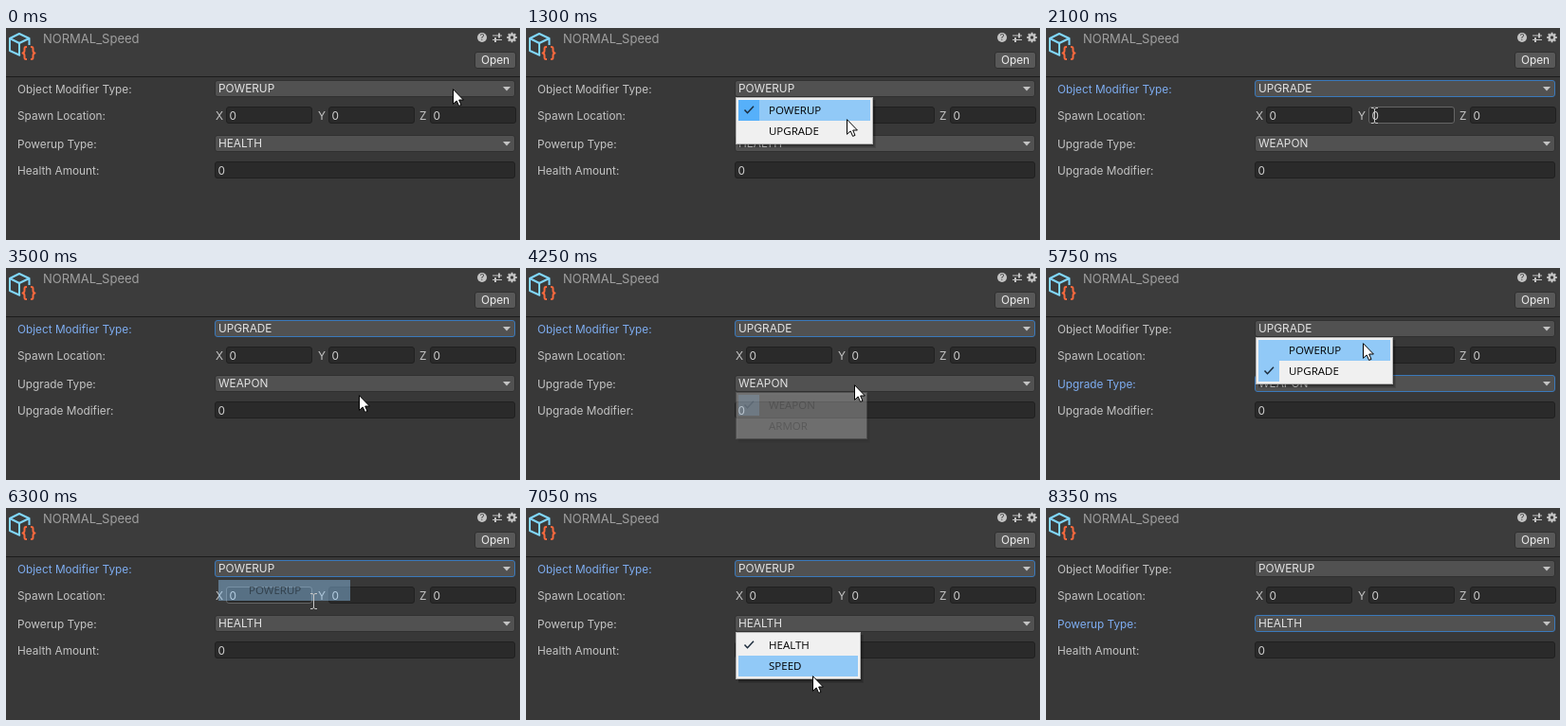
These frames come from a looping animation (542x224 px, 8.4 s). An HTML page with a canvas:

```html
<!DOCTYPE html>
<html lang="en">
<head>
<meta charset="utf-8">
<title>Inspector</title>
<style>
html, body { margin: 0; width: 100%; height: 100%; overflow: hidden; background: #383838; }
canvas { display: block; }
</style>
</head>
<body>
<canvas id="stage" width="542" height="224"></canvas>
<script>
const ctx = document.getElementById('stage').getContext('2d');
const LOOP = 8400, STEP = 50;
const UI = 'Inter, sans-serif', MENU = '"Open Sans", "Noto Sans", sans-serif';

// Pointer path: time, x, y of the tip
const PATH = [
  [0, 471, 64], [900, 471, 64], [1300, 338, 96], [1500, 334, 104], [1750, 334, 104],
  [2550, 363, 75], [2650, 364, 75], [3250, 364, 75], [3500, 372, 134], [3800, 372, 134],
  [4050, 346, 123], [4600, 346, 123], [4800, 342, 161], [5000, 345, 87], [5200, 346, 67],
  [5500, 346, 66], [5950, 326, 88], [6200, 326, 88], [6300, 324, 98], [6500, 318, 122],
  [6800, 312, 126], [7000, 302, 176], [7050, 302, 177], [7250, 302, 177], [7400, 290, 230], [LOOP, 290, 230]
];

const MENUS = [
  { open: 550, close: 1750, y: 73, w: 145, items: ['POWERUP', 'UPGRADE'], checked: 0, pick: 1 },
  { open: 4250, close: 5200, y: 131, w: 139, items: ['WEAPON', 'ARMOR'], checked: 0 },
  { open: 5500, close: 6200, y: 73, w: 145, items: ['POWERUP', 'UPGRADE'], checked: 1, pick: 0 },
  { open: 6600, close: 7700, y: 131, w: 132, items: ['HEALTH', 'SPEED'], checked: 0, plainCheck: true }
];
const CLICKS = [250, 4050];
const FADE_IN = 250, FADE_OUT = 180, ROW = 22;
const FIELDS = [['X', 221, 232], ['Y', 329, 340], ['Z', 436, 447]];

function pointerAt(t) {
  const i = PATH.findIndex(p => p[0] > t);
  const [t0, x0, y0] = PATH[i - 1], [t1, x1, y1] = PATH[i];
  const u = (t - t0) / (t1 - t0), e = u * u * (3 - 2 * u);
  return { x: Math.round(x0 + (x1 - x0) * e), y: Math.round(y0 + (y1 - y0) * e) };
}

function rect(x, y, w, h, color) {
  ctx.fillStyle = color;
  ctx.fillRect(x, y, w, h);
}

function box(x, y, w, h, fill, border) {
  ctx.beginPath();
  ctx.roundRect(x + .5, y + .5, w - 1, h - 1, 2.5);
  ctx.fillStyle = fill;
  ctx.fill();
  ctx.strokeStyle = border;
  ctx.lineWidth = 1;
  ctx.stroke();
}

function text(str, x, y, color, size = 11.8, family = UI, align = 'left') {
  ctx.font = `${size}px ${family}`;
  ctx.textAlign = align;
  ctx.fillStyle = color;
  ctx.fillText(str, x, y);
}

function line(path, color, width) {
  ctx.strokeStyle = color;
  ctx.lineWidth = width;
  ctx.stroke(new Path2D(path));
}

function shape(path, color) {
  ctx.fillStyle = color;
  ctx.fill(new Path2D(path));
}

function disc(x, y, r, color) {
  ctx.fillStyle = color;
  ctx.beginPath();
  ctx.arc(x, y, r, 0, 2 * Math.PI);
  ctx.fill();
}

function drawHeader() {
  const grey = '#c4c4c4', back = '#3c3c3c';
  rect(0, 0, 542, 51, back);
  rect(0, 51, 542, 1, '#1c1c1c');

  ctx.lineJoin = 'round';
  line('M15 29L4 24V11L14 6L24.5 11V18M4 11L14 16L24.5 11M14 16V29', '#81d7fc', 2);
  line('M22 20H21Q19.5 20 19.5 22V24Q19.5 26 17.5 26.5Q19.5 27 19.5 29V31Q19.5 33 21 33H22' +
       'M26 20H27Q28.5 20 28.5 22V24Q28.5 26 30.5 26.5Q28.5 27 28.5 29V31Q28.5 33 27 33H26', '#f8693e', 2);
  ctx.lineJoin = 'miter';
  text('NORMAL_Speed', 39, 16, '#a0a0a0', 13);

  disc(502, 10, 5, grey);
  text('?', 502, 13.3, back, 9, `bold ${UI}`.replace('bold ', ''), 'center');
  line('M513 8H523M513 12.5H523', grey, 1.2);
  rect(519, 5.5, 2, 5, grey);
  rect(515, 10, 2, 5, grey);

  ctx.save();
  ctx.translate(533.5, 10);
  for (let i = 0; i < 8; i++) {
    rect(-1, -5.3, 2, 3, grey);
    ctx.rotate(Math.PI / 4);
  }
  ctx.restore();
  disc(533.5, 10, 3.9, grey);
  disc(533.5, 10, 1.7, back);

  box(494, 25, 44, 18, '#585858', '#303030');
  text('Open', 516, 38, '#eeeeee', 11.8, UI, 'center');
}

function drawLabel(str, y, focused) {
  text(str, 12, y, focused ? '#7eadf1' : '#c4c4c4');
}

function drawDropdown(label, value, y, focused) {
  drawLabel(label, y + 14, focused);
  box(220, y, 317, 18, '#515151', focused ? '#3a79bb' : '#303030');
  text(value, 224, y + 13, '#e4e4e4');
  shape(`M524 ${y + 7}h8l-4 4.5z`, '#c4c4c4');
}

function drawField(x, y, w, hovered) {
  box(x, y, w, 18, '#2a2a2a', hovered ? '#656565' : '#202020');
  text('0', x + 3.5, y + 13.5, '#d2d2d2');
}

function drawItem(menu, i) {
  text(menu.items[i], 256, menu.y + 18 + i * ROW, '#000', 11.5, MENU);
}

function drawMenu(menu, t, pointer) {
  const { y, w } = menu;
  if (t >= menu.close) {
    if (menu.pick === undefined || t >= menu.close + FADE_OUT) return;
    ctx.globalAlpha = 1 - (t - menu.close) / FADE_OUT;
    rect(224, y + 3 + menu.pick * ROW, w - 6, ROW, '#91c9f7');
    drawItem(menu, menu.pick);
    ctx.globalAlpha = 1;
    return;
  }
  ctx.globalAlpha = Math.min(1, (t - menu.open + STEP) / FADE_IN);
  for (let i = 1; i <= 4; i++) rect(224, y + 3, w - 3 + i - 1, 47 + i, 'rgba(0,0,0,.13)');
  rect(221, y, w, 50, '#b4b4b4');
  rect(222, y + 1, w - 2, 48, '#f0f0f0');

  const inside = pointer.x > 221 && pointer.x < 221 + w;
  const hovered = inside ? Math.floor((pointer.y - y - 3) / ROW) : -1;
  menu.items.forEach((_, i) => {
    const top = y + 3 + i * ROW;
    if (i === hovered) rect(224, top, w - 6, ROW, '#91c9f7');
    if (i === menu.checked) {
      if (i === hovered) rect(224, top, 22, ROW, '#56b0fa');
      else if (!menu.plainCheck) rect(224, top, 22, ROW, '#91c9f7');
      line(`M230.5 ${top + 10.5}l3 3.2l6.5 -7`, '#1c2c3c', 1.5);
    }
    drawItem(menu, i);
  });
  ctx.globalAlpha = 1;
}

function drawPointer({ x, y }, overField) {
  ctx.save();
  ctx.translate(x, y);
  if (overField) {
    line('M-3 -7.5H-1L.5 -6.5L2 -7.5H4M.5 -6.5V7.5M-3 8.5H-1L.5 7.5L2 8.5H4', '#c8c8c8', 1);
  } else {
    const arrow = 'M.5 .7V16.3L4.2 12.9L6.6 18.4L9 17.4L6.7 12H11.4Z';
    shape(arrow, '#fff');
    line(arrow, '#000', 1);
  }
  ctx.restore();
}

function draw(t) {
  const pointer = pointerAt(t);
  const menuOpen = MENUS.some(m => t >= m.open && t < m.close);
  const upgrade = t >= 1750 && t < 6200;
  const secondFocused = (t >= 5200 && t < 6200) || t >= 7700;
  const firstFocused = t >= 1750 && !secondFocused;
  const over = (x, y, w) => !menuOpen && pointer.x >= x && pointer.x <= x + w + 1 &&
    pointer.y >= y && pointer.y < y + 18;

  rect(0, 0, 542, 224, '#383838');
  drawHeader();
  drawDropdown('Object Modifier Type:', upgrade ? 'UPGRADE' : 'POWERUP', 55, firstFocused);
  drawLabel('Spawn Location:', 97);
  let overField = false;
  for (const [axis, labelX, x] of FIELDS) {
    const hovered = over(x, 83, 91);
    overField ||= hovered;
    text(axis, labelX, 97, '#c4c4c4');
    drawField(x, 83, 91, hovered);
  }
  drawDropdown(upgrade ? 'Upgrade Type:' : 'Powerup Type:', upgrade ? 'WEAPON' : 'HEALTH', 113, secondFocused);
  drawLabel(upgrade ? 'Upgrade Modifier:' : 'Health Amount:', 155);
  drawField(220, 141, 317, false);

  for (const menu of MENUS) if (t >= menu.open) drawMenu(menu, t, pointer);
  if (CLICKS.some(c => t >= c && t < c + STEP)) disc(pointer.x + .5, pointer.y + 1, 11.5, 'rgba(255,255,0,.47)');
  drawPointer(pointer, overField);
}

const start = performance.now();
function tick() {
  const t = (performance.now() - start) % LOOP;
  draw(Math.floor(t / STEP) * STEP);
  requestAnimationFrame(tick);
}
tick();
</script>
</body>
</html>
```
